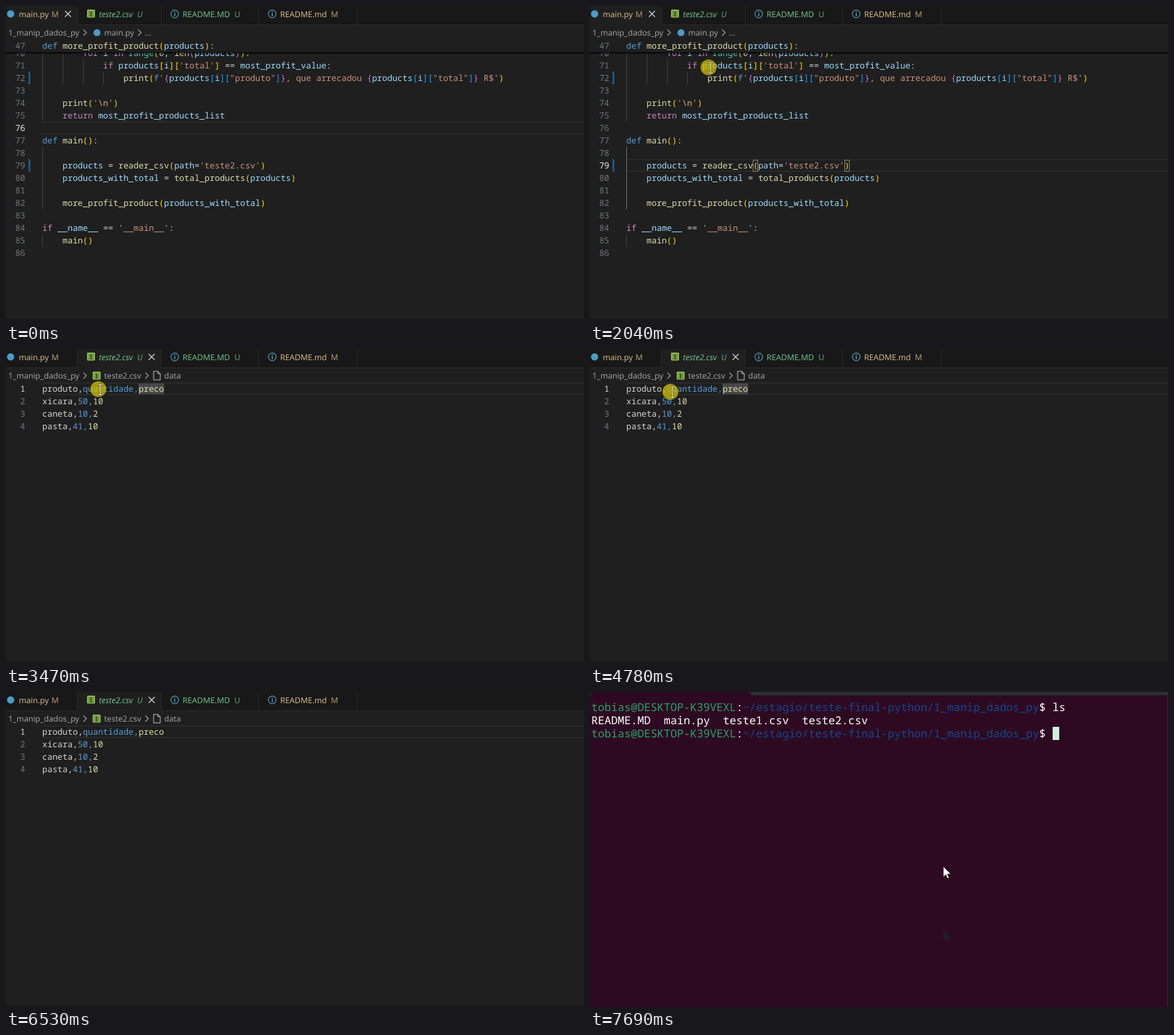
An HTML page for the animation above (8000 ms loop, 877 by 479 pixels).

```html
<!DOCTYPE html>
<html lang="pt">
<head>
<meta charset="utf-8">
<title>Editor e terminal</title>
<style>
html, body { margin: 0; width: 100%; height: 100%; overflow: hidden; background: #1f1f1f; }
svg { display: block; width: 877px; height: 479px; }
text { white-space: pre; text-rendering: geometricPrecision; }
.code { font: 12.83px "Noto Sans Mono", "DejaVu Sans Mono", monospace; }
.ui { font: 12.2px "Open Sans", "Noto Sans", sans-serif; }
.term { font: 500 16.667px "Noto Sans Mono", "DejaVu Sans Mono", monospace; }
</style>
</head>
<body>
<svg id="stage" viewBox="0 0 877 479">
  <defs>
    <pattern id="hatch" width="4" height="4" patternUnits="userSpaceOnUse">
      <path d="M-1 5L5 -1M-1 1L1 -1M3 5L5 3" stroke="#2488db" stroke-width="1.5"/>
    </pattern>
    <linearGradient id="shade" x2="0" y2="1">
      <stop stop-color="#000" stop-opacity=".85"/><stop offset="1" stop-color="#000" stop-opacity="0"/>
    </linearGradient>
    <g id="sheet">
      <rect x="-6" y="-6" width="12" height="12" rx="1" fill="#8dc149"/>
      <path d="M-4 -2.5H4M-4 .5H4M-4 3.5H4M0 -3V4.5" stroke="#1f1f1f" stroke-width=".9"/>
    </g>
    <g id="info" fill="none" stroke="#519aba" stroke-width="1.2">
      <circle r="5.8"/><path d="M0 -1V3.5M0 -3.5V-2" stroke-width="1.6"/>
    </g>
    <path id="chevron" d="M-2.5 -4.5L2 0L-2.5 4.5" fill="none" stroke="#a9a9a9" stroke-width="1.1"/>
    <path id="cross" d="M-4.5 -4.5L4.5 4.5M4.5 -4.5L-4.5 4.5" stroke-width="1.3"/>
    <path id="page" d="M-5 -6.5H1.5L5 -3V6.5H-5ZM1.5 -6.5V-3H5" fill="none" stroke="#c5c5c5"/>
    <path id="arrow" d="M0 0V16.5L3.8 13L6.3 18.6L9 17.4L6.5 12H11.6Z"/>
  </defs>
</svg>
<script>
const LOOP = 8000, CELL = 7.697, LEFT = 55;
const stage = document.getElementById('stage');
const INK = {
  w: '#d4d4d4', b: '#569cd6', y: '#dcdcaa', v: '#9cdcfe', c: '#c586c0', t: '#4ec9b0',
  n: '#b5cea8', s: '#ce9178', e: '#d7ba7d', 1: '#ffd700', 2: '#da70d6', 3: '#179fff',
  g: '#26a269', p: '#12488b', f: '#ffffff'
};

function add(parent, tag, attrs = {}, text) {
  const el = document.createElementNS('http://www.w3.org/2000/svg', tag);
  for (const k in attrs) el.setAttribute(k, attrs[k]);
  if (text !== undefined) el.textContent = text;
  parent.append(el);
  return el;
}
const group = parent => add(parent, 'g');
const box = (parent, x, y, width, height, fill, more) =>
  add(parent, 'rect', { x, y, width, height, fill, ...more });
const icon = (parent, id, x, y, more) =>
  add(parent, 'use', { href: '#' + id, transform: `translate(${x} ${y})`, ...more });
const dot = (parent, cx, cy, r) => add(parent, 'circle', { cx, cy, r, fill: '#4a9bc7' });
const label = (parent, x, y, fill, text, more) =>
  add(parent, 'text', { class: 'ui', x, y, fill, ...more }, text);

// "ink|text|ink|text" becomes one coloured line
function rich(parent, cls, x, y, spec) {
  const line = add(parent, 'text', { class: cls, x, y });
  const parts = spec.split('|');
  for (let i = 0; i < parts.length; i += 2) add(line, 'tspan', { fill: INK[parts[i]] }, parts[i + 1]);
}
const number = (parent, n, y, fill = '#6e7681') =>
  add(parent, 'text', { class: 'code', x: 29.3, y, fill, 'text-anchor': 'end' }, n);
function currentLine(parent, top, n) {
  box(parent, LEFT, top, 822, 1.5, '#2d2d2d');
  box(parent, LEFT, top + 17.5, 822, 1.5, '#2d2d2d');
  number(parent, n, top + 14, '#d4d4d4');
}

// Visible only inside the given [from, to] spans
function showAt(el, ...spans) {
  const keys = [];
  const key = (t, opacity) => keys.push({ offset: t / LOOP, opacity, easing: 'step-end' });
  if (spans[0][0] > 0) key(0, 0);
  for (const [from, to] of spans) {
    key(from, 1);
    if (to < LOOP) key(to, 0);
  }
  key(LOOP, keys[keys.length - 1].opacity);
  el.animate(keys, { duration: LOOP, iterations: Infinity });
}
function travel(el, path) {
  const at = (t, x, y) => ({ offset: t / LOOP, transform: `translate(${x}px, ${y}px)` });
  const last = path[path.length - 1];
  const keys = [at(0, path[0][1], path[0][2]), ...path.map(p => at(...p)), at(LOOP, last[1], last[2])];
  el.animate(keys, { duration: LOOP, iterations: Infinity });
}

// Editor frame
box(stage, 0, 0, 877, 479, '#1f1f1f');
box(stage, 0, 0, 877, 28, '#181818');
box(stage, 0, 28, 877, 1, '#2b2b2b');
box(stage, 0, 476, 877, 3, '#181818');
const script = group(stage), table = group(stage);
box(script, 0, 0, 109, 29, '#1f1f1f');
box(table, 109, 0, 127, 29, '#1f1f1f');

const tabs = group(stage), MOD = '#e2c08d', NEW = '#73c991';
for (const x of [108, 235, 383, 532]) box(tabs, x, 0, 1, 28, '#2b2b2b');
dot(tabs, 7, 12, 5.5);
icon(tabs, 'sheet', 129, 11.5);
icon(tabs, 'info', 256, 12);
icon(tabs, 'info', 404, 12);
const slant = { style: 'font-style: italic' }, dim = { opacity: .82 };
for (const [x, name, bx, badge, color, style] of [
  [19.5, 'main.py', 69, 'M', MOD], [141, 'teste2.csv', 199, 'U', NEW, slant],
  [268, 'README.MD', 346.5, 'U', NEW], [416, 'README.md', 493, 'M', MOD]
]) {
  label(tabs, x, 17, color, name, style);
  label(tabs, bx, 16.5, color, badge, { ...style, ...dim });
}

function crumbs(parent, file, end) {
  label(parent, 3.5, 45, '#a9a9a9', '1_manip_dados_py');
  icon(parent, 'chevron', 120, 40.5);
  label(parent, 149, 45, '#a9a9a9', file);
  icon(parent, 'chevron', end, 40.5);
}

// Python view
crumbs(script, 'main.py', 203);
dot(script, 138, 40.5, 5.3);
label(script, 210.5, 45, '#a9a9a9', '...');
icon(script, 'cross', 94, 12, { stroke: '#d4d4d4' });

const lineTop = n => 81 + 19 * (n - 71);
const guide = (parent, col, from, to, color = '#404040') =>
  box(parent, Math.round(LEFT + col * CELL), lineTop(from), 1, 19 * (to - from + 1), color);
[[0, 70, 75], [4, 70, 72], [8, 71, 72], [12, 72, 72], [0, 78, 82], [0, 85, 85]].forEach(g => guide(script, ...g));

const CODE = {
  70: [8, 'c|for|v| i |c|in|t| range|1|(|n|0|w|, |y|len|2|(|v|products|2|)|1|)|w|:'],
  71: [12, "c|if|v| products|1|[|v|i|1|][|s|'total'|1|]|w| == |v|most_profit_value|w|:"],
  72: [16, 'y|print|1|(|b|f|s|\'|2|{|v|products|3|[|v|i|3|][|s|"produto"|3|]|2|}|s|, que arrecadou |2|{|v|products|3|[|v|i|3|][|s|"total"|3|]|2|}|s| R$\'|1|)'],
  74: [4, "y|print|1|(|s|'|e|\\n|s|'|1|)"],
  75: [4, 'c|return|v| most_profit_products_list'],
  77: [0, 'b|def|y| main|1|()|w|:'],
  79: [4, "v|products|w| = |y|reader_csv|1|(|v|path|w|=|s|'teste2.csv'|1|)"],
  80: [4, 'v|products_with_total|w| = |y|total_products|1|(|v|products|1|)'],
  82: [4, 'y|more_profit_product|1|(|v|products_with_total|1|)'],
  84: [0, "c|if|v| __name__|w| == |s|'__main__'|w|:"],
  85: [4, 'y|main|1|()']
};
for (let n = 70; n <= 86; n++) {
  number(script, n, lineTop(n) + 14);
  if (CODE[n]) rich(script, 'code', LEFT + CODE[n][0] * CELL, lineTop(n) + 14, CODE[n][1]);
}
for (const n of [72, 79]) box(script, 34, lineTop(n), 3, 19, 'url(#hatch)');
box(script, 0, 51, 877, 19, '#1f1f1f');
box(script, 0, 70, 877, 4, 'url(#shade)');
number(script, 47, 65);
rich(script, 'code', LEFT, 65, 'b|def|y| more_profit_product|1|(|v|products|1|)|w|:');

const blank = group(script), call = group(script), caret = group(script), hover = group(script);
currentLine(blank, lineTop(76), 76);
currentLine(call, lineTop(79), 79);
guide(call, 0, 78, 82, '#707070');
for (const col of [25, 43])
  box(call, Math.round(LEFT + col * CELL) + .5, 234.5, 7, 17, 'none', { stroke: '#888888' });
box(caret, 300, 234, 2, 18, '#aeafad');
icon(hover, 'cross', 221, 12, { stroke: '#9a9a9a' });

// CSV view
crumbs(table, 'teste2.csv', 214);
icon(table, 'sheet', 137.5, 40.5);
icon(table, 'page', 229, 40.5);
label(table, 240, 45, '#a9a9a9', 'data');
icon(table, 'cross', 221, 12, { stroke: '#d4d4d4' });
const word = group(table), tick = group(table);
box(word, 201, 51, 39, 19, '#484848');
currentLine(table, 51, 1);
['produto,quantidade,preco', 'xicara,50,10', 'caneta,10,2', 'pasta,41,10'].forEach((row, i) => {
  const y = 65 + 19 * i, [a, b, c] = row.split(',');
  if (i) number(table, i + 1, y);
  rich(table, 'code', LEFT, y, `w|${a},|b|${b},|y|${c}`);
});
box(tick, 239.5, 51, 2, 18, '#aeafad');

// Terminal
const shell = group(stage);
box(shell, 0, 0, 877, 479, '#2e0a22');
add(shell, 'path', { d: 'M242 0H877V5H248Q243 5 242 0ZM0 0H2Q2 3 0 5Z', fill: '#2c302d' });
box(shell, 876, 5, 1, 474, '#3a2a35');
const prompt = 'g|tobias@DESKTOP-K39VEXL|f|:|p|~/estagio/teste-final-python/1_manip_dados_py|f|$ ';
rich(shell, 'term', 2, 29, prompt + 'ls');
rich(shell, 'term', 2, 49, 'f|README.MD  main.py  teste1.csv  teste2.csv');
rich(shell, 'term', 2, 69, prompt);
const block = group(shell);
box(block, 702, 53, 10, 20, '#ccf2dc');
icon(shell, 'arrow', 536, 361, { fill: '#241e22' });
const pointer = group(shell);
icon(pointer, 'arrow', 0, 0, { fill: '#fff', stroke: '#000', 'stroke-width': .8 });

// Mouse over the editor
const mouse = group(stage), glow = group(mouse), beam = group(mouse), hand = group(mouse);
add(glow, 'circle', { r: 12, fill: '#cdbc05', opacity: .77 });
const bar = { d: 'M0 -7.5H2.3Q3 -7.5 3 -6.5Q3 -7.5 4 -7.5H6M3 -7V8M0 8.5H2.3Q3 8.5 3 7.5Q3 8.5 4 8.5H6', fill: 'none' };
add(beam, 'path', { ...bar, stroke: '#000', 'stroke-width': 2.4, opacity: .6 });
add(beam, 'path', { ...bar, stroke: '#fff', 'stroke-width': 1.2 });
add(hand, 'path', {
  d: 'M0 2Q0 0 1.7 0Q3.5 0 3.5 2V8Q5.5 7 6.5 8.5Q8.3 8 9 9.5Q11 9.3 11 11.5V15Q11 18 9 20V22H1V20L-3.5 14Q-5 11.5 -3 11Q-1.5 11 0 13Z',
  fill: '#fff', stroke: '#000', 'stroke-width': 1
});
add(hand, 'path', { d: 'M3.5 8V12M6.5 9V12M9 10V12.5', stroke: '#555', 'stroke-width': .7 });

// Timing
showAt(script, [0, 2860]);
showAt(table, [2860, 6600]);
showAt(blank, [0, 1140], [2200, LOOP]);
showAt(call, [1140, 2200]);
showAt(caret, [1140, 1640], [2140, 2200]);
showAt(hover, [2640, 2860]);
showAt(word, [2860, 5600]);
showAt(tick, [2860, 3360], [3860, 4360], [4860, 5360]);
showAt(shell, [6600, LOOP]);
showAt(block, [6600, 7140], [7690, LOOP]);
showAt(mouse, [120, 5870]);
showAt(glow, [1140, 5870]);
showAt(beam, [120, 1740], [1990, 2600], [3300, 5870]);
showAt(hand, [1740, 1990], [2600, 3300]);
travel(mouse, [
  [120, 721, 465], [330, 560, 382], [600, 372, 282], [870, 299, 241], [940, 298, 241], [1140, 298, 241],
  [1210, 332, 240], [1280, 332, 240], [1520, 270, 130], [1770, 190, 46], [1970, 190, 46],
  [2180, 160, 186], [2320, 160, 186], [2560, 172, 70], [2720, 177, 14], [2900, 177, 14],
  [3200, 160, 42], [3470, 140, 61], [3540, 140, 61], [3800, 178, 58], [4080, 146, 96], [4380, 136, 129],
  [4600, 130, 98], [4780, 122, 65], [4850, 122, 65], [5060, 106, 94], [5250, 112, 129],
  [5480, 85, 132], [5800, 130, 250], [5870, 130, 250]
]);
travel(pointer, [[6600, 536, 361], [6760, 536, 340], [7070, 536, 265]]);
</script>
</body>
</html>
```
